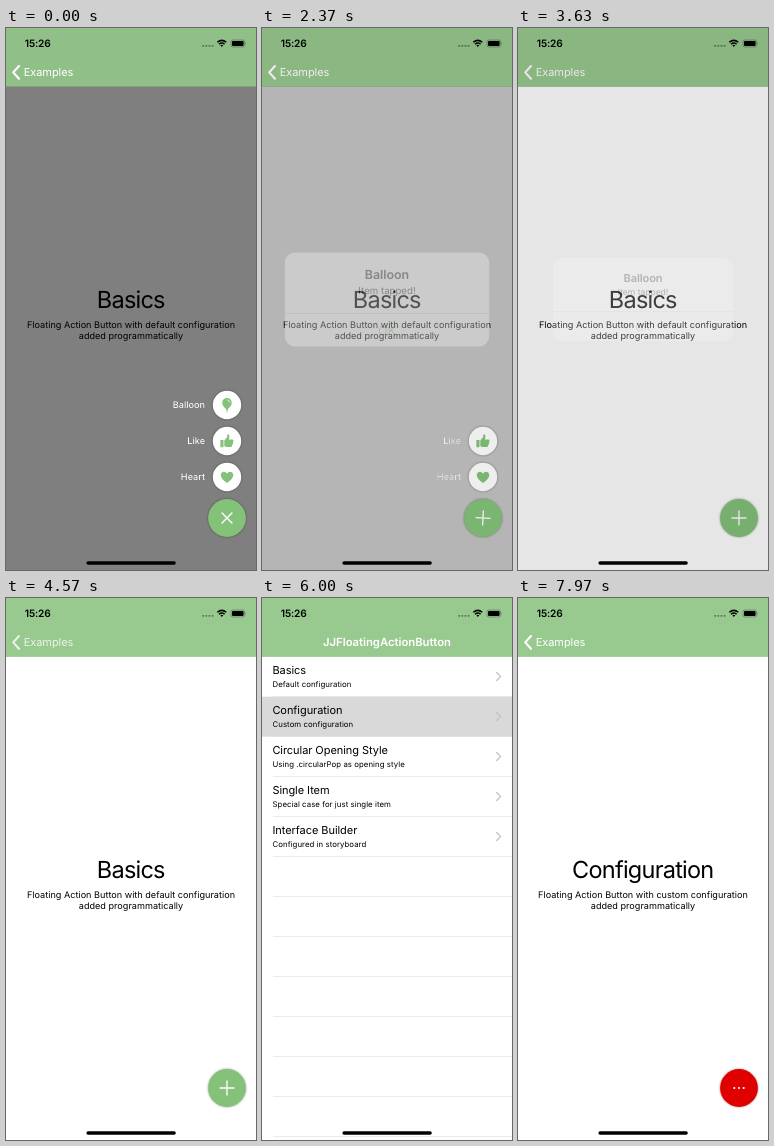
Animation, 250 px wide and 542 px high, one loop 8 s. Source, as an HTML page:

```html
<!DOCTYPE html>
<html lang="en">
<head>
<meta charset="utf-8">
<title>Floating action button demo</title>
<style>
  html, body { margin: 0; width: 100%; height: 100%; overflow: hidden; background: #fff; }
  svg { display: block; width: 100vw; height: 100vh; }
  text {
    font-family: Inter, "Liberation Sans", sans-serif;
    font-optical-sizing: none;
    text-rendering: geometricPrecision;
  }
  .mid { text-anchor: middle; }
  .h1 { font-size: 23.5px; letter-spacing: -.76px; }
  .note { font-size: 9.1px; letter-spacing: .01px; }
  .row { font-size: 11px; letter-spacing: -.06px; }
  .sub { font-size: 7.8px; letter-spacing: .06px; }
  .bar { font-size: 11px; letter-spacing: -.06px; fill: #fff; }
  .title { font-size: 11.3px; letter-spacing: -.02px; }
  .bold { font-weight: 600; }
  .clock { font-size: 10.2px; letter-spacing: -.2px; }
  .label { font-size: 9.1px; font-weight: 500; fill: #fff; text-anchor: end; filter: drop-shadow(0 .6px .7px rgba(0,0,0,.4)); }
  .disc { filter: drop-shadow(0 .7px 1.2px rgba(0,0,0,.4)); }
  .line { fill: none; stroke-linecap: round; stroke-linejoin: round; }
</style>
</head>
<body>
<svg id="stage" viewBox="0 0 250 542" preserveAspectRatio="none"></svg>
<script>
const GREEN = '#84c27a';
const TOP = 58.7, ROW = 40;
const LOOP = 8000;

const ROWS = [
  ['Basics', 'Default configuration'],
  ['Configuration', 'Custom configuration'],
  ['Circular Opening Style', 'Using .circularPop as opening style'],
  ['Single Item', 'Special case for just single item'],
  ['Interface Builder', 'Configured in storyboard'],
];

const ICONS = {
  Balloon: `<path d="M0-7C3-7 4.8-4.8 4.8-2.2C4.8 .6 2.2 3 .7 3.9L1.2 4.9H-1.2L-.7 3.9C-2.2 3-4.8 .6-4.8-2.2C-4.8-4.8-3-7 0-7Z"/>
    <path class="line" d="M0 5q1 1 0 2.2" stroke="${GREEN}" stroke-width=".8"/>
    <path class="line" d="M.6-5.1Q2.6-4.7 2.9-2.6" stroke="#fff" stroke-width=".7"/>`,
  Like: `<rect x="-6.6" y="-1" width="3.1" height="7.2" rx=".4"/>
    <path d="M-2.7-.6L.2-4V-6C.2-7.2 2.4-7 2.4-4.6C2.4-3.5 2-2.4 1.8-1.6H5.2C6.8-1.6 7-.2 6 .4C6.7 1 6.5 2 5.7 2.3C6.2 3 5.8 4 5 4.2C5.3 5.2 4.6 6 3.6 6H.5C-.8 6-1.6 5.2-2.7 5.2Z"/>`,
  Heart: `<path d="M0 6C-4 3-6.3 .8-6.3-2C-6.3-4-4.8-5.3-3.2-5.3C-1.8-5.3-.6-4.5 0-3.3C.6-4.5 1.8-5.3 3.2-5.3C4.8-5.3 6.3-4 6.3-2C6.3 .8 4 3 0 6Z"/>`,
};

const row = ([name, info], i) => {
  const y = TOP + i * ROW;
  return `<text class="row" x="10.4" y="${y + 17.7}">${name}</text>
    <text class="sub" x="10.5" y="${y + 30}">${info}</text>
    <path class="line" d="M234.6 ${y + 15.8}l4 4-4 4" stroke="#c5c5c9" stroke-width="1.3"/>`;
};

const separators = Array.from({ length: 12 }, (_, i) =>
  `<rect x="11" y="${TOP + (i + 1) * ROW - .4}" width="240" height=".7" fill="#e3e3e5"/>`).join('');

const heading = (title, kind, id) => `<g id="${id}">
  <text class="h1 mid" x="124.8" y="280">${title}</text>
  <text class="note mid" x="125" y="300">Floating Action Button with ${kind} configuration</text>
  <text class="note mid" x="125" y="311.2">added programmatically</text></g>`;

const item = (name, i) => `<g id="${name}">
  <text class="label" x="199" y="${380.4 + i * 36}">${name}</text>
  <g transform="translate(221 ${377 + i * 36})"><g id="${name}Disc">
    <circle class="disc" r="14.2" fill="#fff"/><g fill="${GREEN}">${ICONS[name]}</g>
  </g></g></g>`;

document.getElementById('stage').innerHTML = `
<defs>
  <linearGradient id="edge"><stop offset="0" stop-opacity="0"/><stop offset="1" stop-opacity=".07"/></linearGradient>
</defs>
<rect width="250" height="542" fill="#fff"/>
<g id="list">
  <rect id="mark" y="${TOP}" width="250" height="${ROW}" fill="#d9d9d9"/>
  ${separators}${ROWS.map(row).join('')}
</g>
<rect id="shade" width="250" height="542"/>
<g id="page">
  <rect x="-4" y="${TOP}" width="4" height="484" fill="url(#edge)"/>
  <rect width="250" height="542" fill="#fff"/>
  ${heading('Basics', 'default', 'basics')}
  ${heading('Configuration', 'custom', 'config')}
  <rect id="veil" width="250" height="542"/>
  <g id="menu">${Object.keys(ICONS).map(item).join('')}</g>
  <g transform="translate(221 490)">
    <circle id="fab" class="disc" r="18.9"/>
    <path id="plus" class="line" d="M-7 0H7M0-7V7" stroke="#fff" stroke-width="1.35"/>
    <g id="dots" fill="#fff"><circle cx="-4.7" r="1.1"/><circle r="1.1"/><circle cx="4.7" r="1.1"/></g>
  </g>
</g>
<rect width="250" height="${TOP}" fill="#98ca8f"/>
<rect y="${TOP}" width="250" height=".25" fill-opacity=".3"/>
<rect id="navVeil" width="250" height="${TOP}"/>
<text id="title" class="bar title bold mid" y="48.3">JJFloatingActionButton</text>
<g id="back">
  <path id="chevron" class="line" d="M13 38L7.2 44.4L13 50.8" stroke="#fff" stroke-width="2.1"/>
  <text id="backText" class="bar mid" y="48.3">Examples</text>
</g>
<rect id="dim" width="250" height="542"/>
<g id="alert">
  <rect x="-90" y="-41.5" width="180" height="83" rx="9" fill="#fafafa"/>
  <path id="okMark" d="M-90 12.5H90V32.5a9 9 0 0 1-9 9H-81a9 9 0 0 1-9-9Z" fill="#dedede"/>
  <rect x="-90" y="12" width="180" height=".6" fill="#c6c6c8"/>
  <g id="alertText">
    <text class="row bold mid" y="-17.7">Balloon</text>
    <text class="mid" y="-4.5" font-size="8.5">Item tapped!</text>
    <text class="row mid" y="31" fill="${GREEN}">OK</text>
  </g>
</g>
<text class="clock bold" x="18.8" y="19.2">15:26</text>
<g fill-opacity=".4">${[0, 1, 2, 3].map(i => `<rect x="${196.2 + i * 3.1}" y="17" width="2" height="1.7" rx=".6"/>`).join('')}</g>
<g class="line" stroke="#000" stroke-width="1.5" style="stroke-linecap:butt">
  <path d="M211.3 14.3Q215.8 10.4 220.3 14.3"/><path d="M213 16.2Q215.8 13.8 218.6 16.2"/>
</g>
<path d="M214.3 17.3Q215.8 16.2 217.3 17.3L215.8 19Z"/>
<rect x="225" y="12" width="13.6" height="7" rx="2" fill="none" stroke="#000" stroke-opacity=".45" stroke-width=".6"/>
<rect x="226" y="13" width="11.6" height="5" rx="1.1"/>
<path d="M239.3 14.2q1.2 1.2 0 2.6Z" fill-opacity=".5"/>
<rect x="80.4" y="533.3" width="89.4" height="3.4" rx="1.7"/>`;

const el = Object.fromEntries([...document.querySelectorAll('#stage [id]')].map(e => [e.id, e]));
const set = (id, name, value) => el[id].setAttribute(name, value);
const fade = (id, value) => set(id, 'opacity', value);
const clamp = v => Math.min(1, Math.max(0, v));
const slide = (t, start) => 1 - (1 - clamp((t - start) / 400)) ** 1.9;

// Piecewise linear value from [time, value] steps.
function track(t, steps) {
  let [t0, v0] = steps[0];
  for (const [t1, v1] of steps) {
    if (t < t1) return t1 > t0 ? v0 + (v1 - v0) * (t - t0) / (t1 - t0) : v1;
    [t0, v0] = [t1, v1];
  }
  return v0;
}

function drawMenu(t) {
  const open = track(t, [[2285, 1], [2370, .48], [2430, .18], [2520, 0]]);
  fade('veil', .5 * open);
  fade('navVeil', .055 * open);
  [['Balloon', 2290], ['Like', 2375], ['Heart', 2460]].forEach(([name, start]) => {
    const gone = clamp((t - start) / 75);
    fade(name, 1 - gone);
    set(name + 'Disc', 'transform', `scale(${1 - .6 * gone})`);
  });
  const tapped = track(t, [[1920, 0], [2000, 1]]);
  el.BalloonDisc.firstElementChild.setAttribute('fill', `rgb(${Array(3).fill(255 - 30 * tapped)})`);
  set('plus', 'transform', `rotate(${track(t, [[2285, 45], [2370, 3], [2430, -2], [2520, 0]])})`);
}

function drawAlert(t) {
  const shown = track(t, [[2290, 0], [2370, .32], [2450, .66], [2560, .9], [2780, 1],
                          [3500, 1], [3630, .5], [3720, .2], [3830, 0]]);
  const leaving = t > 3000;
  const size = leaving ? 1 : 1.2 - .2 * shown;
  fade('dim', .2 * shown);
  fade('alert', leaving ? shown * shown : shown);
  fade('alertText', .75 + .25 * shown);
  fade('okMark', track(t, [[3360, 0], [3400, 1], [3480, 1], [3540, 0]]));
  set('alert', 'transform', `translate(125 271.5) scale(${size})`);
}

function drawPages(t) {
  const second = t >= 5500;
  const p = second ? slide(t, 6033) : 1 - slide(t, 4630);
  set('page', 'transform', `translate(${250 * (1 - p)} 0)`);
  set('list', 'transform', `translate(${-75 * p} 0)`);
  fade('page', p > 0 ? 1 : 0);
  fade('shade', .1 * p);
  fade('basics', second ? 0 : 1);
  fade('config', second ? 1 : 0);
  fade('plus', second ? 0 : 1);
  fade('dots', second ? 1 : 0);
  const red = 255 - 31 * track(t, [[7720, 0], [7800, 1]]);
  set('fab', 'fill', second ? `rgb(${red},0,0)` : GREEN);

  set('mark', 'y', TOP + (second ? ROW : 0));
  fade('mark', second ? (t >= 6000 ? 1 : 0) : track(t, [[4800, 1], [5030, 0]]));

  const x = 125 - 82.5 * p;
  set('title', 'x', x);
  set('backText', 'x', x);
  fade('title', 1 - p);
  fade('backText', clamp((p - .4) / .5));
  fade('chevron', p);
  fade('back', track(t, [[4560, 1], [4590, .4], [4630, .4], [4700, 1]]));
}

function draw(t) {
  drawMenu(t);
  drawAlert(t);
  drawPages(t);
}

const start = performance.now();
function tick() {
  draw((performance.now() - start) % LOOP);
  requestAnimationFrame(tick);
}
draw(0);
requestAnimationFrame(tick);
</script>
</body>
</html>
```
